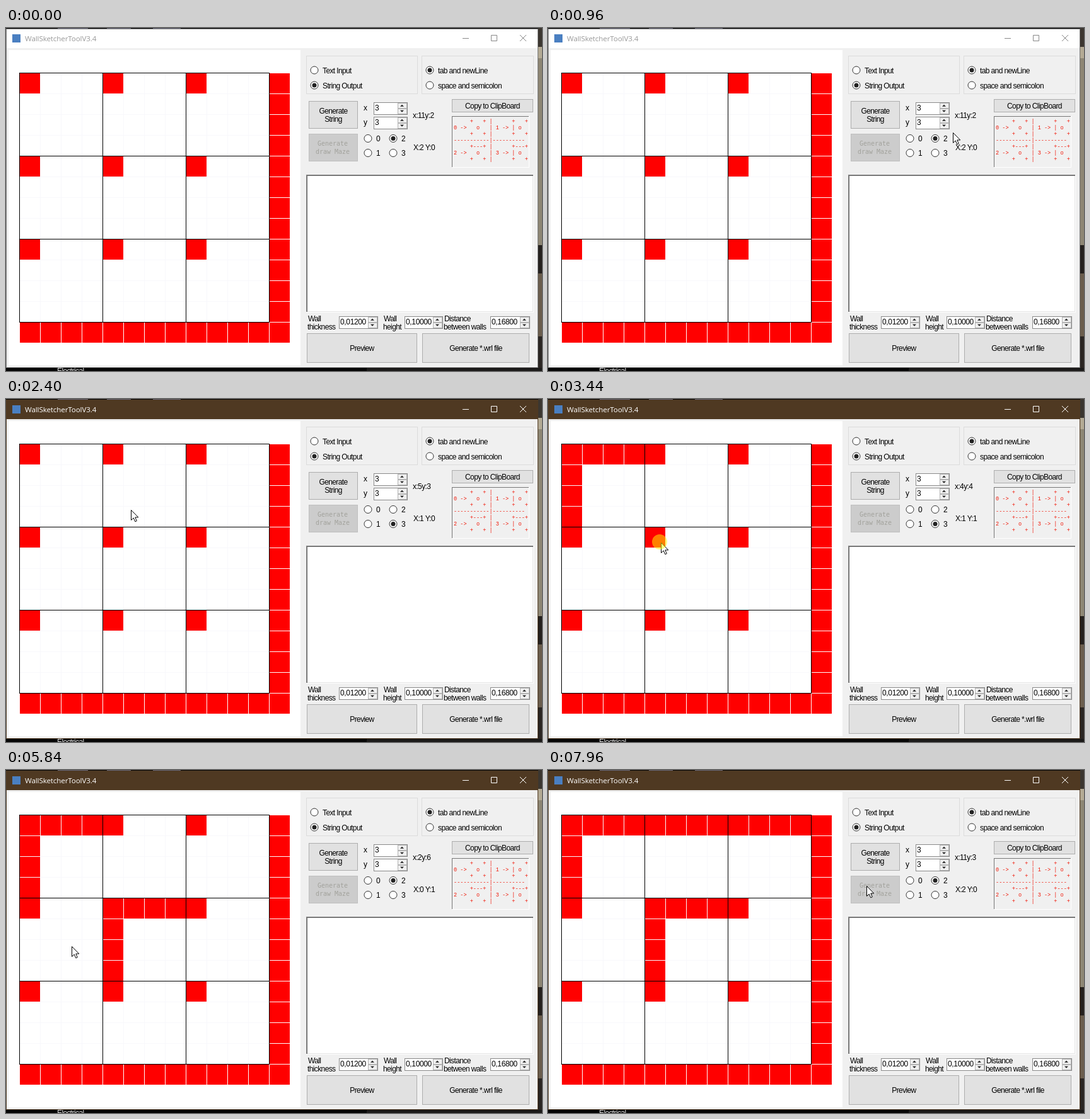
An HTML page for the animation above (8 s loop, 850 px wide and 545 px high).

```html
<!DOCTYPE html>
<html lang="en">
<head>
<meta charset="utf-8">
<title>Maze editor</title>
<style>
html, body { margin: 0; width: 100%; height: 100%; overflow: hidden; background: #000; }
svg { display: block; width: 850px; height: 545px; }
text { font: 12px "Liberation Sans", Arial, sans-serif; letter-spacing: -.62px; fill: #000; white-space: pre; }
.num { letter-spacing: -.35px; }
.title { font: 11.6px "Open Sans", "Noto Sans", sans-serif; letter-spacing: -.1px; }
.off { font: 10px "DejaVu Sans Mono", monospace; letter-spacing: 0; fill: #a2a29c; }
.key { font: 8.55px "Liberation Mono", monospace; letter-spacing: 0; fill: #f01808; }
.mid { text-anchor: middle; }
rect { shape-rendering: crispEdges; }
</style>
</head>
<body>
<svg id="stage" viewBox="0 0 850 545"></svg>
<script>
const LOOP = 8000, STEP = 68, PITCH = 33, LEFT = 22, TOP = 72;
const stage = document.getElementById('stage');
const $ = id => document.getElementById(id);

const rect = (x, y, w, h, fill, extra = '') =>
  `<rect x="${x}" y="${y}" width="${w}" height="${h}" fill="${fill}" ${extra}/>`;
const frame = (x, y, w, h, fill, stroke, id = '') =>
  rect(x + .5, y + .5, w - 1, h - 1, fill, `stroke="${stroke}" ${id && `id="${id}"`}`);
const text = (x, y, s, cls = '', id = '') =>
  `<text x="${x}" y="${y}" class="${cls}" ${id && `id="${id}"`}>${s}</text>`;
const path = (d, extra) => `<path d="${d}" ${extra}/>`;
const cell = (c, r) => rect(LEFT + c * PITCH, TOP + r * PITCH, 32, 32, '#f00');
const range = n => [...Array(n).keys()];

const button = (id, x, y, w, h, lines) =>
  frame(x, y, w, h, '#e1e1e1', '#adadad', id) +
  lines.map((s, i) => text(x + w / 2, y + h / 2 + 4 + (i - (lines.length - 1) / 2) * 13, s, 'mid')).join('');

const radio = (id, x, y, label, on) =>
  `<circle id="${id}" cx="${x}" cy="${y}" r="6" fill="#fff" stroke="#333"/>` +
  `<circle id="${id}dot" cx="${x}" cy="${y}" r="3.5" fill="#222" visibility="${on ? 'visible' : 'hidden'}"/>` +
  text(x + 13, y + 4.5, label);

function spinner(x, y, w, value) {
  const bx = x + w - 16;
  const arrow = (cy, d) => path(`M${bx + 4} ${cy + d} h6 l-3 ${-3 * d}z`, 'fill="#222"');
  return frame(x, y, w, 20, '#fff', '#8a8a8a') + text(x + 2, y + 13, value, 'num') +
    frame(bx, y + 1, 15, 9, '#f0f0f0', '#b4b4b4') + frame(bx, y + 10, 15, 9, '#f0f0f0', '#b4b4b4') +
    arrow(y + 5.8, 1) + arrow(y + 13.8, -1);
}

function desktop() {
  return rect(0, 0, 850, 545, '#050505') +
    [[82, 48], [160, 38], [233, 44]].map(([x, w]) => rect(x, 0, w, 1, '#667')).join('') +
    rect(844, 0, 6, 30, '#3b3630') + rect(844, 30, 6, 18, '#b3aa94') +
    rect(844, 48, 6, 297, '#8d8674') + rect(844, 345, 6, 45, '#24201d') +
    rect(844, 390, 6, 100, '#6a5d4d') + rect(844, 490, 6, 55, '#2a2522') +
    rect(572, 540, 278, 5, '#1b1a19') + text(81, 549, 'Electrical', '', 'caption');
}

function chrome() {
  return rect(0, 1, 844, 539, '#777', 'id="edge"') + rect(1, 2, 842, 537, '#f0f0f0') +
    rect(1, 2, 842, 30, '#fff', 'id="bar"') + rect(10, 10, 13, 13, '#4a7fc1') +
    text(30, 21, 'WallSketcherToolV3.4', 'title', 'name') +
    path('M724 16.5h10 M769.5 11.5h9v9h-9z M815 11l10 10 M825 11l-10 10', 'id="glyphs" fill="none"');
}

function maze() {
  let s = rect(4, 35, 463, 501, '#fff');
  for (const i of range(12)) {
    s += rect(54 + i * PITCH, 72, 1, 396, '#f8f8fc') + rect(22, 104 + i * PITCH, 396, 1, '#f8f8fc');
  }
  for (const i of range(13)) s += cell(i, 12) + (i < 12 ? cell(12, i) : '');
  for (const i of range(9)) s += cell(i % 3 * 4, Math.floor(i / 3) * 4);
  s += walls.map((w, i) => `<g id="wall${i}">${[1, 2, 3].map(k =>
    cell(w.x * 4 + k, w.y * 4) + (w.side ? cell(w.x * 4, w.y * 4 + k) : '')).join('')}</g>`).join('');
  for (const i of range(4)) {
    s += rect(21 + i * 132, 71, 1, 397, '#000') + rect(21, 71 + i * 132, 397, 1, '#000');
  }
  return s;
}

function panel() {
  const post = '     +   + |      +   +', beam = '     +---+ |      +---+';
  const key = [post, '0 -&gt;   o   | 1 -&gt; | o', post, '-----------|----------',
    beam, '2 -&gt;   o   | 3 -&gt; | o', post];
  return frame(476, 44, 177, 61, 'none', '#dcdcdc') + frame(659, 44, 178, 61, 'none', '#dcdcdc') +
    radio('ra', 489, 67, 'Text Input') + radio('rb', 489, 91, 'String Output', true) +
    radio('rc', 672, 67, 'tab and newLine', true) + radio('rd', 672, 91, 'space and semicolon') +
    button('gen', 480, 116, 78, 44, ['Generate', 'String']) +
    frame(480, 168, 78, 44, '#ccc', '#bfbfbf') +
    text(518, 187, 'Generate', 'off mid') + text(518, 200, 'draw Maze', 'off mid') +
    text(567, 131, 'x') + text(567, 154, 'y') + spinner(583, 118, 54, '3') + spinner(583, 141, 54, '3') +
    radio('r0', 574, 175.5, '0') + radio('r1', 574, 198.5, '1') +
    radio('r2', 614, 175.5, '2', true) + radio('r3', 614, 198.5, '3') +
    text(645, 143, '', '', 'pos') + text(646, 194, '', '', 'block') +
    button('copy', 707, 113, 129, 21, ['Copy to ClipBoard']) +
    rect(707, 140, 123, 82, '#fff') + rect(707, 140, 122, 81, '#777') + rect(708, 141, 121, 80, '#f0f0f0') +
    key.map((s, i) => text(710, 151 + i * 10, s, 'key')).join('') +
    rect(476, 233, 361, 219, '#fff') + rect(476, 233, 360, 218, '#8a8a8a') +
    rect(477, 234, 359, 217, '#666') + rect(478, 235, 358, 216, '#e3e3e3') + rect(478, 235, 357, 215, '#fff') +
    text(479, 466, 'Wall') + text(478, 479, 'thickness') + text(599, 466, 'Wall') + text(598, 479, 'height') +
    text(695, 466, 'Distance') + text(694, 479, 'between walls') +
    spinner(528, 458, 62, '0,01200') + spinner(632, 458, 61, '0,10000') + spinner(768, 458, 63, '0,16800') +
    button('view', 477, 485, 175, 47, ['Preview']) + button('file', 660, 485, 170, 47, ['Generate *.wrl file']);
}

// Cursor route: time, x, y
const route = [
  [130, 720, 505], [330, 560, 400], [480, 418, 285], [560, 262, 210], [640, 185, 175],
  [760, 300, 150], [820, 405, 155], [890, 560, 160], [960, 642, 166], [1300, 628, 188],
  [1580, 620, 198], [1730, 620, 198], [1870, 560, 192], [2000, 447, 187], [2130, 300, 180],
  [2400, 198, 176], [2540, 170, 172], [2680, 126, 165], [2950, 126, 165], [3160, 130, 170],
  [3440, 179, 228], [3580, 179, 228], [3860, 212, 230], [4000, 300, 222], [4130, 410, 200],
  [4200, 520, 192], [4330, 632, 180], [4600, 624, 176], [5010, 624, 176], [5150, 560, 185],
  [5280, 390, 217], [5420, 272, 234], [5780, 104, 280], [6100, 172, 245], [6350, 106, 255],
  [6600, 180, 270], [6660, 185, 285], [6930, 199, 398], [7010, 199, 398], [7240, 215, 160],
  [7340, 215, 160], [7480, 236, 172], [7550, 300, 130], [7760, 300, 130], [7840, 350, 150],
  [7890, 412, 178], [7960, 505, 184]
];
const clicks = [1580, 2950, 3440, 5010, 7240, 7760];
const walls = [
  { at: 3020, x: 0, y: 0, side: true }, { at: 3580, x: 1, y: 1, side: true },
  { at: 7310, x: 1, y: 0 }, { at: 7800, x: 2, y: 0 }
];
const ACTIVE = 1730, PICK3 = 1730, PICK2 = 5080;

// The pointer is sampled in short steps, as in a screen recording.
function pointer(t) {
  if (t < route[0][0]) return null;
  let i = route.length - 1;
  while (route[i][0] > t) i--;
  const [t0, x0, y0] = route[i], next = route[i + 1];
  if (!next) return [x0, y0];
  const k = Math.floor((t - t0) / STEP) * STEP / (next[0] - t0);
  return [x0 + (next[1] - x0) * k, y0 + (next[2] - y0) * k].map(Math.round);
}

// Last grid square under the pointer.
function lastCell(t) {
  for (; t >= route[0][0]; t -= 10) {
    const [x, y] = pointer(t);
    if (x >= 22 && x < 418 && y >= 71 && y < 467) {
      return [Math.floor((x - 22) / PITCH), Math.floor((y - 71) / PITCH)];
    }
  }
  return [11, 2];
}

const set = (id, attrs) => { for (const k in attrs) $(id).setAttribute(k, attrs[k]); };
const show = (id, on) => set(id, { visibility: on ? 'visible' : 'hidden' });
const move = (id, p) => set(id, { transform: `translate(${p[0]} ${p[1]})` });

stage.innerHTML = desktop() + chrome() + maze() + panel() +
  path('M.5 .5V16.5L4.2 13L6.8 18.8L9.3 17.7L6.8 12H11.8Z', 'id="arrow" fill="#fff" stroke="#000"') +
  '<circle id="halo" cx="-2" cy="-1" r="12" fill="#ff0" fill-opacity=".5"/>';
$('caption').style.fill = '#ddd';

const radios = ['r0', 'r1', 'r2', 'r3'], buttons = ['gen', 'copy', 'view', 'file'];
const boxes = Object.fromEntries([...radios, ...buttons].map(id => [id, $(id).getBBox()]));
const over = (id, p) => {
  const b = boxes[id];
  const reach = id[0] === 'r' ? 18 : 0;
  return !!p && p[0] >= b.x && p[0] <= b.x + b.width + reach && p[1] >= b.y && p[1] <= b.y + b.height;
};

function draw(t) {
  const p = pointer(t), active = t >= ACTIVE, pick = t >= PICK3 && t < PICK2 ? 'r3' : 'r2';
  set('bar', { fill: active ? '#4f3922' : '#fff' });
  set('edge', { fill: active ? '#4f3922' : '#777' });
  set('glyphs', { stroke: active ? '#fff' : '#888' });
  $('name').style.fill = active ? '#fff' : '#999';

  walls.forEach((w, i) => show('wall' + i, t >= w.at));
  for (const id of radios) {
    set(id, { stroke: over(id, p) ? '#0078d7' : '#333' });
    show(id + 'dot', id === pick);
  }
  for (const id of buttons) {
    const hot = over(id, p);
    set(id, { fill: hot ? '#e5f1fb' : '#e1e1e1', stroke: hot ? '#0078d7' : '#adadad' });
  }

  const [x, y] = lastCell(t);
  $('pos').textContent = `x:${x}y:${y}`;
  $('block').textContent = `X:${x >> 2} Y:${y >> 2}`;

  show('arrow', p);
  show('halo', clicks.some(c => t >= c && t < c + 140));
  if (p) { move('arrow', p); move('halo', p); }
}

const start = performance.now();
function tick() {
  draw((performance.now() - start) % LOOP);
  requestAnimationFrame(tick);
}
tick();
</script>
</body>
</html>
```
